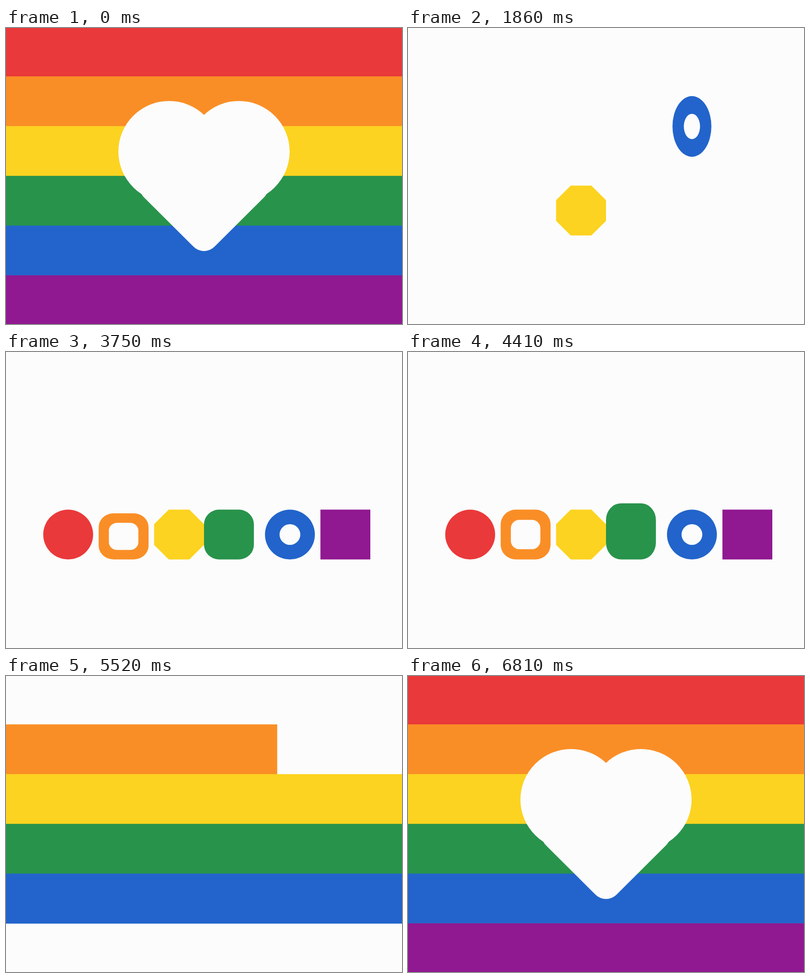
Write an HTML page with a canvas that moves like this. It is 800 px wide and 600 px high and loops after 6840 ms.

```html
<!DOCTYPE html>
<html lang="en">
<head>
<meta charset="utf-8">
<title>Rainbow shapes</title>
<style>
  html, body { margin: 0; width: 100%; height: 100%; overflow: hidden; background: #fcfcfc; }
  canvas { display: block; width: 800px; height: 600px; }
</style>
</head>
<body>
<canvas id="stage" width="800" height="600"></canvas>
<script>
const ctx = document.getElementById('stage').getContext('2d');
const LOOP = 6840, SIZE = 100.8, HALF = SIZE / 2, GAP = 11.2;
const FLOOR = 420.4, ROW_X = 405.6, PAPER = '#fcfcfc';
const RED = 0, ORANGE = 1, YELLOW = 2, GREEN = 3, BLUE = 4, PURPLE = 5;
const COLORS = ['#ea393a', '#fa8e26', '#fcd320', '#28934b', '#2264cb', '#901891'];
const DROP_AT = [2460, 1980, 1260, null, 1740, 2220];
const STRIPE_AT = [5485, 5379, 5282, 5185, 5282, 5580];

const clamp = v => Math.min(1, Math.max(0, v));
const span = (t, from, to) => clamp((t - from) / (to - from));
const mix = (a, b, p) => a + (b - a) * p;
const inOut = power => p => p < 0.5
  ? Math.pow(2 * p, power) / 2
  : 1 - Math.pow(2 - 2 * p, power) / 2;
const quad = inOut(2), cubic = inOut(3);

function elasticOut(p, period = 0.53) {
  if (p <= 0) return 0;
  if (p >= 1) return 1;
  return 1 + Math.pow(2, -10 * p) * Math.sin((p - period / 4) * 2 * Math.PI / period);
}

function disc(x, y, r) {
  ctx.moveTo(x + r, y);
  ctx.arc(x, y, r, 0, 2 * Math.PI);
}

function roundSquare(half, r) {
  ctx.roundRect(-half, -half, 2 * half, 2 * half, r);
}

function octagon() {
  for (let k = 0; k < 8; k++) {
    const a = (k + 0.5) * Math.PI / 4, r = HALF / Math.cos(Math.PI / 8);
    ctx.lineTo(r * Math.cos(a), r * Math.sin(a));
  }
  ctx.closePath();
}

const OUTLINES = [
  () => disc(0, 0, HALF),
  () => { roundSquare(HALF, 30); roundSquare(29.8, 17); },
  octagon,
  () => roundSquare(HALF, 30),
  () => { disc(0, 0, HALF); disc(0, 0, 21); },
  () => ctx.rect(-HALF, -HALF, SIZE, SIZE)
];

// Draws a shape scaled around the middle of its lower edge.
function drawShape(i, x, bottom, sx, sy) {
  ctx.save();
  ctx.translate(x, bottom);
  ctx.scale(sx, sy);
  ctx.translate(0, -HALF);
  ctx.beginPath();
  OUTLINES[i]();
  ctx.fillStyle = COLORS[i];
  ctx.fill('evenodd');
  ctx.restore();
}

function dropPose(i, t) {
  const age = t - DROP_AT[i];
  const fall = clamp((age + 10) / 180);
  const pose = { bottom: FLOOR * Math.pow(fall, 1.5), sx: 0.78, sy: 1.22 };
  const hit = span(age, 150, 210);
  const rest = Math.pow(1 - span(age, 210, 360), 2.2);
  if (age < 210) {
    pose.sx = mix(0.78, 1.2, hit);
    pose.sy = mix(1.22, 0.75, hit);
  } else {
    pose.sx = 1 + 0.2 * rest;
    pose.sy = 1 - 0.25 * rest;
  }
  return pose;
}

// The green block hops out from behind the ring.
function hopPose(t) {
  const p = span(t, 2985, 3300);
  const rest = Math.pow(1 - span(t, 3300, 3390), 2);
  const land = span(p, 0.75, 1);
  return {
    shift: (1 - quad(p)) * 123.2,
    bottom: FLOOR - 66 * 4 * p * (1 - p),
    sx: land < 1 ? mix(0.76, 1.1, land) : 1 + 0.1 * rest,
    sy: land < 1 ? mix(1.22, 0.88, land) : 1 - 0.12 * rest
  };
}

function bump(p, dip, rise) {
  const s = Math.sin(2 * Math.PI * p);
  return s > 0 ? -dip * s : -rise * s;
}

function waveScale(i, t) {
  const back = 3360 + (PURPLE - i) * 90;
  const forth = 4020 + i * 110;
  return 1 + bump(span(t, back, back + 90), 0.09, 0.27)
           + bump(span(t, forth, forth + 110), 0.1, 0.38);
}

function drawRow(t) {
  const squeeze = quad(span(t, 4755, 5020));
  const angle = cubic(span(t, 5142, 5430)) * Math.PI / 2;
  const centerX = mix(ROW_X, -52, quad(span(t, 5038.5, 5430)));
  const centerY = mix(FLOOR - HALF, 300, cubic(span(t, 5220, 5430)));

  ctx.save();
  ctx.translate(centerX, centerY);
  ctx.rotate(angle);
  for (let i = RED; i <= PURPLE; i++) {
    const isGreen = i === GREEN;
    if (t < (isGreen ? 2990 : DROP_AT[i] - 10)) continue;
    const pose = isGreen ? hopPose(t) : dropPose(i, t);
    const slot = (i - 2.5) * (SIZE + GAP * (1 - squeeze));
    const x = slot + (isGreen ? pose.shift - GAP * (1 - squeeze) : 0);
    if (i === BLUE && t > 2980 && t < 3400) {
      ctx.beginPath();
      disc(slot, 0, 22);
      ctx.fillStyle = PAPER;
      ctx.fill();
    }
    drawShape(i, x, pose.bottom - FLOOR + HALF, pose.sx, pose.sy * waveScale(i, t));

    // Stripes overlap slightly so that no seam shows between them.
    const length = 900 * quad(span(t, STRIPE_AT[i], STRIPE_AT[i] + 240));
    if (length > 0) {
      ctx.fillStyle = COLORS[i];
      ctx.fillRect(x - HALF - 0.3, -length, SIZE + 0.6, length);
    }
  }
  ctx.restore();
}

function drawHeart(scale) {
  ctx.save();
  ctx.translate(400, 300);
  ctx.scale(scale, scale);
  ctx.fillStyle = PAPER;
  ctx.beginPath();
  disc(-70.5, -49.6, 102.5);
  disc(70.5, -49.6, 102.5);
  ctx.fill();
  ctx.translate(0, 22);
  ctx.rotate(Math.PI / 4);
  ctx.beginPath();
  roundSquare(SIZE, 30);
  ctx.fill();
  ctx.restore();
}

function draw(time) {
  ctx.fillStyle = PAPER;
  ctx.fillRect(0, 0, 800, 600);
  if (time >= 840 && time < 1245) return;

  // The closing flag carries over into the start of the loop.
  const t = time < 840 ? time + LOOP : time;
  drawRow(t);
  if (t > 6060) {
    const zoom = span(t, LOOP + 665, LOOP + 838);
    drawHeart(elasticOut(span(t, 6060, 6840)) + 4 * zoom * zoom);
  }
}

const start = performance.now();
function tick() {
  draw((performance.now() - start) % LOOP);
  requestAnimationFrame(tick);
}
tick();
</script>
</body>
</html>
```
